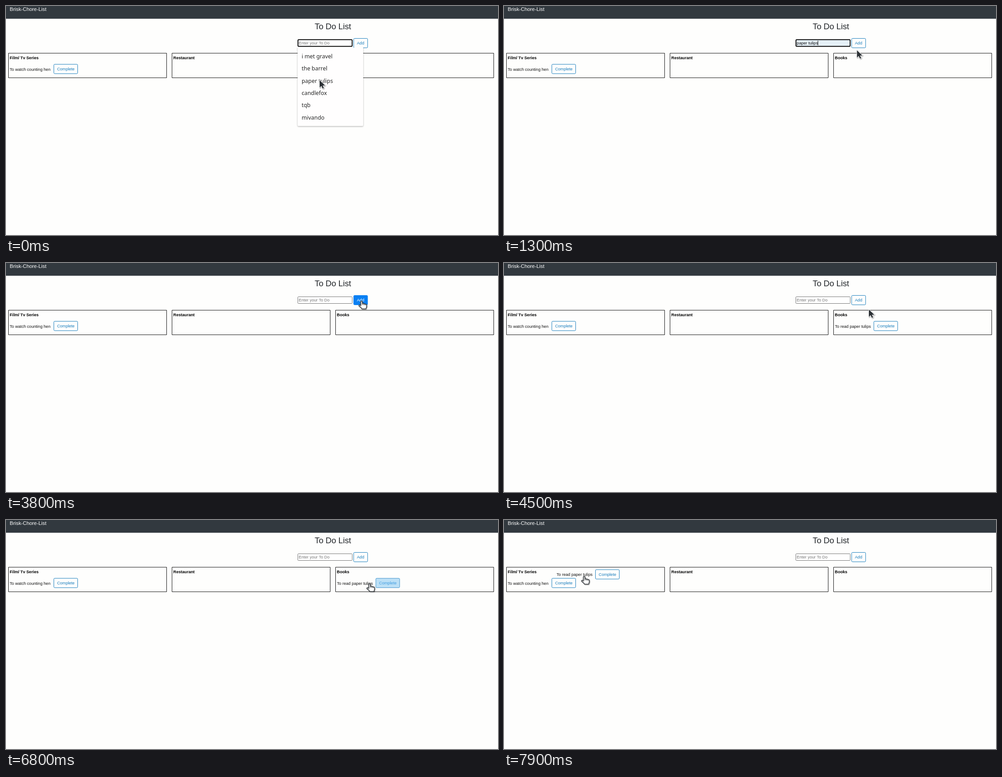
An HTML page with a canvas for the animation above (8 s loop, 1095 by 512 pixels).

```html
<!DOCTYPE html>
<html lang="en">
<head>
<meta charset="utf-8">
<title>To Do List</title>
<style>
  html, body { margin: 0; width: 100%; height: 100%; overflow: hidden; background: #fefefd; }
  canvas { display: block; width: 1095px; height: 512px; }
</style>
</head>
<body>
<canvas id="stage" width="1095" height="512"></canvas>
<script>
const ctx = document.getElementById('stage').getContext('2d');
const LOOP = 8000;
const SANS = '"Liberation Sans", Arial, sans-serif';
const BODY = `9.125px ${SANS}`;
const BG = '#fefefd', BLUE = '#0a80f3', LINK = '#167cbc';
const BOOK = 'paper tulips';
const OPTIONS = ['i met gravel', 'the barrel', BOOK, 'candlefox', 'tqb', 'mivando'];

const clamp = v => Math.min(1, Math.max(0, v));
const mix = (a, b, p) => a + (b - a) * p;
const smooth = p => p * p * (3 - 2 * p);
const step = t => Math.floor(t / 100) * 100;
const progress = (t, from, to) => clamp((step(t) - from) / (to - from));

function text(str, x, y, color = '#111', font = BODY) {
  ctx.font = font;
  ctx.fillStyle = color;
  ctx.fillText(str, x, y);
}

function box(x, y, w, h, r, fill, stroke, line = 1) {
  ctx.beginPath();
  ctx.roundRect(x, y, w, h, r);
  if (fill) { ctx.fillStyle = fill; ctx.fill(); }
  if (stroke) { ctx.strokeStyle = stroke; ctx.lineWidth = line; ctx.stroke(); }
}

const LOOKS = {
  plain: [null, LINK, LINK],
  hover: [BLUE, BLUE, '#fff'],
  picked: ['#bce0f6', '#3f93cb', '#3e9be0']
};

function button(label, x, y, w, look) {
  const [fill, edge, ink] = LOOKS[look];
  box(x, y, w, 21, 2, fill, edge);
  text(label, x + 7.2, y + 13.5, ink);
}

function card(x, title) {
  box(x, 105.5, 352, 55, 0, null, '#111');
  text(title, x + 2.8, 119.3, '#000', `bold ${BODY}`);
}

function item(x, y, label, buttonX, look) {
  text(label, x, y + 4, '#111');
  button('Complete', buttonX, y - 10.2, 53, look);
}

function field(s) {
  const fill = s.filled ? '#e6f1f8' : '#fff';
  if (s.focus) box(649.8, 75.3, 120.6, 15, 2, fill, '#0b0b0b', 2);
  else box(649.5, 75.5, 121, 15, 1, fill, '#747474');
  if (s.filled) text(BOOK, 651.6, 85.7);
  else text('Enter your To Do', 651.6, 85.7, '#757575');
  if (s.caret) {
    ctx.fillStyle = '#111';
    ctx.fillRect(s.caret, 77.5, 1, 10.5);
  }
}

function menu(hot) {
  ctx.save();
  ctx.beginPath();
  ctx.rect(640, 93, 170, 190);
  ctx.clip();
  ctx.shadowColor = 'rgba(0,0,0,.35)';
  ctx.shadowBlur = 3;
  ctx.shadowOffsetY = 1;
  box(649, 90, 146, 178.5, 2, '#fffefe');
  ctx.restore();
  if (hot) box(649, 153.5, 146, 27, 0, '#e6e6e6');
  OPTIONS.forEach((name, i) =>
    text(name, 658, 117 + i * 27.3, '#262626', '500 12.4px "Noto Sans", "Open Sans", sans-serif'));
}

const ARROW = new Path2D('M0 0V16.4L3.9 12.8L6.7 18.8L9.4 17.6L6.8 11.7H12.2Z');
const HAND = new Path2D('M-2 10V1.6Q-2 0 -.2 0T1.8 1.6V5.6Q4 4.6 5 6.2Q7 5.4 8 7Q11.2 6.6 11.2 9.4V12.6Q11 15 9.4 17.6H.8Q-.6 15 -3 13.4L-6 10.8Q-6.4 8.6 -4 8.8Z');
const KNUCKLES = new Path2D('M1.8 5.6V9M5 6.2V9.4M8 7V9.6');

function pointer({ x, y, hand }) {
  ctx.save();
  ctx.translate(x, y);
  ctx.lineJoin = 'round';
  ctx.shadowColor = 'rgba(0,0,0,.4)';
  ctx.shadowBlur = 2;
  ctx.shadowOffsetX = ctx.shadowOffsetY = 1;
  ctx.lineWidth = hand ? 1.5 : 2;
  ctx.strokeStyle = hand ? '#3d4246' : '#fff';
  ctx.fillStyle = hand ? '#fff' : '#2b3034';
  if (hand) ctx.fill(HAND);
  ctx.stroke(hand ? HAND : ARROW);
  ctx.shadowColor = 'transparent';
  if (hand) { ctx.lineWidth = 1; ctx.stroke(KNUCKLES); }
  else ctx.fill(ARROW);
  ctx.restore();
}

// Each entry: time, x, y, hand; the last one reached holds.
const STOPS = [
  [0, 698, 166, 0], [1100, 708, 232, 0], [1300, 785.5, 99, 0],
  [1400, 786, 95, 0], [1500, 787, 90, 1], [1600, 788, 86, 1], [1700, 788.3, 85, 1],
  [3600, 789.5, 85.5, 1], [3700, 790.5, 85.5, 1], [3800, 791.3, 85, 1],
  [4000, 791.3, 85, 0], [4400, 796, 90, 1], [4500, 812, 104, 0],
  [4600, 831, 123, 0], [4700, 843, 136.5, 1], [4900, 845, 140, 1], [5000, 846, 142.5, 1],
  [6800, 809, 142.5, 1], [7000, 786.5, 143.5, 1]
];

function pointerAt(t, drag) {
  if (drag) return { x: drag.x + 61.5, y: drag.y + 4.8, hand: 1 };
  const [, x, y, hand] = STOPS.filter(s => s[0] <= t).pop();
  return { x, y, hand };
}

function dragAt(t) {
  if (t < 7200) return null;
  const p = progress(t, 7100, 7900);
  return { x: mix(736.5, 117, smooth(p)), y: mix(140.5, 121.2, p) + 37 * Math.sin(Math.PI * p) };
}

function draw(t) {
  const within = (a, b) => t >= a && t < b;
  const drag = dragAt(t);

  ctx.fillStyle = BG;
  ctx.fillRect(0, 0, 1095, 512);
  ctx.fillStyle = '#32393f';
  ctx.fillRect(0, 0, 1095, 28.5);
  text('Brisk-Chore-List', 8.3, 11, '#fff', `11.4px ${SANS}`);
  text('To Do List', 687, 51.8, '#212529', `18.25px ${SANS}`);

  card(5.5, 'Film/ Tv Series');
  card(369.5, 'Restaurant');
  card(733.5, 'Books');
  item(8.3, 140.5, 'To watch counting hen', 106.5, 'plain');

  field({
    focus: t < 2100,
    filled: within(200, 3000),
    caret: within(400, 1000) ? 651.5 : within(1000, 2100) ? 698.2 : 0
  });
  if (within(2100, 3000)) box(772, 70.8, 35, 24.4, 3.5, null, '#8fc4f5', 2);
  button('Add', 773.8, 72.5, 31, within(1500, 4000) || within(4400, 4500) ? 'hover' : 'plain');

  if (t >= 4000) {
    const at = drag || { x: 736.5, y: 140.5 };
    const look = within(4700, 6800) ? 'hover' : within(6800, 7000) ? 'picked' : 'plain';
    item(at.x, at.y, 'To read ' + BOOK, at.x + 86.6, look);
  }
  if (t < 1000) menu(t >= 200);
  pointer(pointerAt(t, drag));
}

const start = performance.now();
function tick(now) {
  draw(Math.max(0, now - start) % LOOP);
  requestAnimationFrame(tick);
}
draw(0);
requestAnimationFrame(tick);
</script>
</body>
</html>
```
